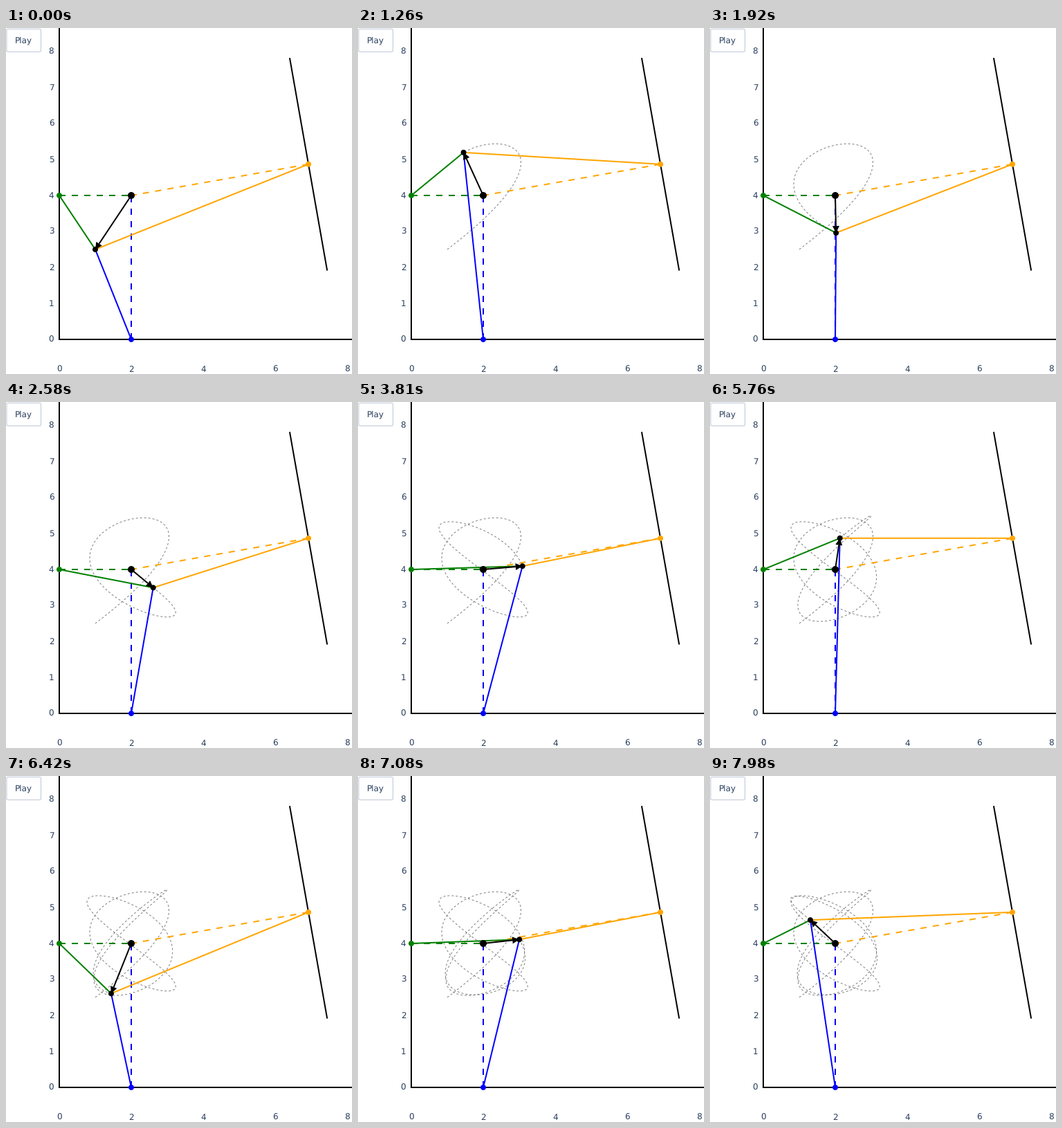
Animation, 500 px wide and 500 px high, one loop 8000 ms. Source, as a matplotlib script:

```python
import numpy as np
import matplotlib
import matplotlib.pyplot as plt
from matplotlib.animation import FuncAnimation
from matplotlib.patches import Circle, FancyBboxPatch, Polygon

matplotlib.rcParams["path.simplify"] = False
matplotlib.rcParams["text.hinting"] = "none"
matplotlib.rcParams["font.family"] = "DejaVu Sans"

SIZE, DPI = 500, 100
PT = 72 / DPI          # points per pixel
FRAMES, LOOP = 267, 8000
STEP = 0.061           # simulated time per frame
INK = "#2a3f5f"

fig = plt.figure(figsize=(SIZE / DPI, SIZE / DPI), dpi=DPI, facecolor="white")
ax = fig.add_axes([0, 0, 1, 1])
ax.set_xlim(0, SIZE)
ax.set_ylim(SIZE, 0)
ax.axis("off")


def px(p):
    """Plot units to stage pixels."""
    p = np.asarray(p, float)
    return np.stack([77 + 52 * p[..., 0], 450 - 52 * p[..., 1]], axis=-1)


def line(points, color, width=2, dash=None, z=2):
    style = (0, (dash / width, dash / width)) if dash else "-"
    pts = np.asarray(points)
    return ax.plot(pts[:, 0], pts[:, 1], color=color, lw=width * PT, ls=style,
                   solid_capstyle="butt", dash_capstyle="butt",
                   solid_joinstyle="miter", snap=False, zorder=z)[0]


def dot(center, radius, color, z=5):
    return ax.add_patch(Circle(center, radius, fc=color, ec="none", lw=0, zorder=z))


def label(x, y, text, ha="center"):
    ax.text(x, y, text, ha=ha, va="baseline", color=INK, fontsize=12 * PT)


# Three springs meet at REST; stiffness matrix from their directions.
REST = np.array([2.0, 4.0])
START = np.array([-1.0, -1.5])
TILT = np.radians(10)
springs = [  # colour, direction, length, stiffness
    ("blue", np.array([0.0, -1.0]), 4, 2),
    ("green", np.array([-1.0, 0.0]), 2, 3),
    ("orange", np.array([np.cos(TILT), np.sin(TILT)]), 5, 1),
]
K = sum(k * np.outer(d, d) for _, d, _, k in springs)
lam, modes = np.linalg.eigh(K)
tau = STEP * np.arange(FRAMES)
swing = np.cos(np.outer(tau, np.sqrt(lam))) * (modes.T @ START)
path = px(REST + swing @ modes.T)

# Walls
line([(77, 0), (77, 451)], "black", z=1)
line([(76, 450), (500, 450)], "black", z=1)
normal = springs[2][1]
foot = REST + 5 * normal
along = 3 * np.array([-normal[1], normal[0]])
line(px([foot + along, foot - along]), "black", z=1)

# Axis labels and button
for v in range(9):
    label(69.3, 450 - 52 * v + 4.2, str(v), ha="right")
for v in range(0, 9, 2):
    label(77 + 52 * v, 497, str(v))
ax.add_patch(FancyBboxPatch((1, 1.5), 49.5, 33, fc="white", ec="#BEC8D9", lw=PT,
                            boxstyle="round,pad=0,rounding_size=2", snap=False))
label(25.5, 21, "Play")

# Springs at rest and in motion
center = px(REST)
anchors, coils = [], []
for color, direction, length, _ in springs:
    anchor = px(REST + length * direction)
    line([anchor, center], color, dash=9, z=2)
    coils.append(line([anchor, path[0]], color, z=3))
    dot(anchor, 4, color)
    anchors.append(anchor)

trail = line(path[:1], "gray", width=1, dash=3, z=1.5)
dot(center, 5, "black")
bob = dot(path[0], 4, "black")
shaft = line([center, path[0]], "black", z=6)
head = ax.add_patch(Polygon([center] * 3, fc="black", ec="none", lw=0, zorder=6))


def draw(i):
    tip = path[i]
    trail.set_data(path[:i + 1, 0], path[:i + 1, 1])
    for coil, anchor in zip(coils, anchors):
        coil.set_data(*np.array([anchor, tip]).T)
    bob.center = tip
    u = (tip - center) / max(np.hypot(*(tip - center)), 1e-6)
    side = np.array([-u[1], u[0]])
    base = tip - 10 * u
    shaft.set_data(*np.array([center, base]).T)
    head.set_xy([base + 5 * side, base - 5 * side, tip])
    return [trail, bob, shaft, head, *coils]


ani = FuncAnimation(fig, draw, frames=FRAMES, interval=LOOP / FRAMES,
                    init_func=lambda: draw(0), repeat=True, repeat_delay=0)
plt.show()
```
